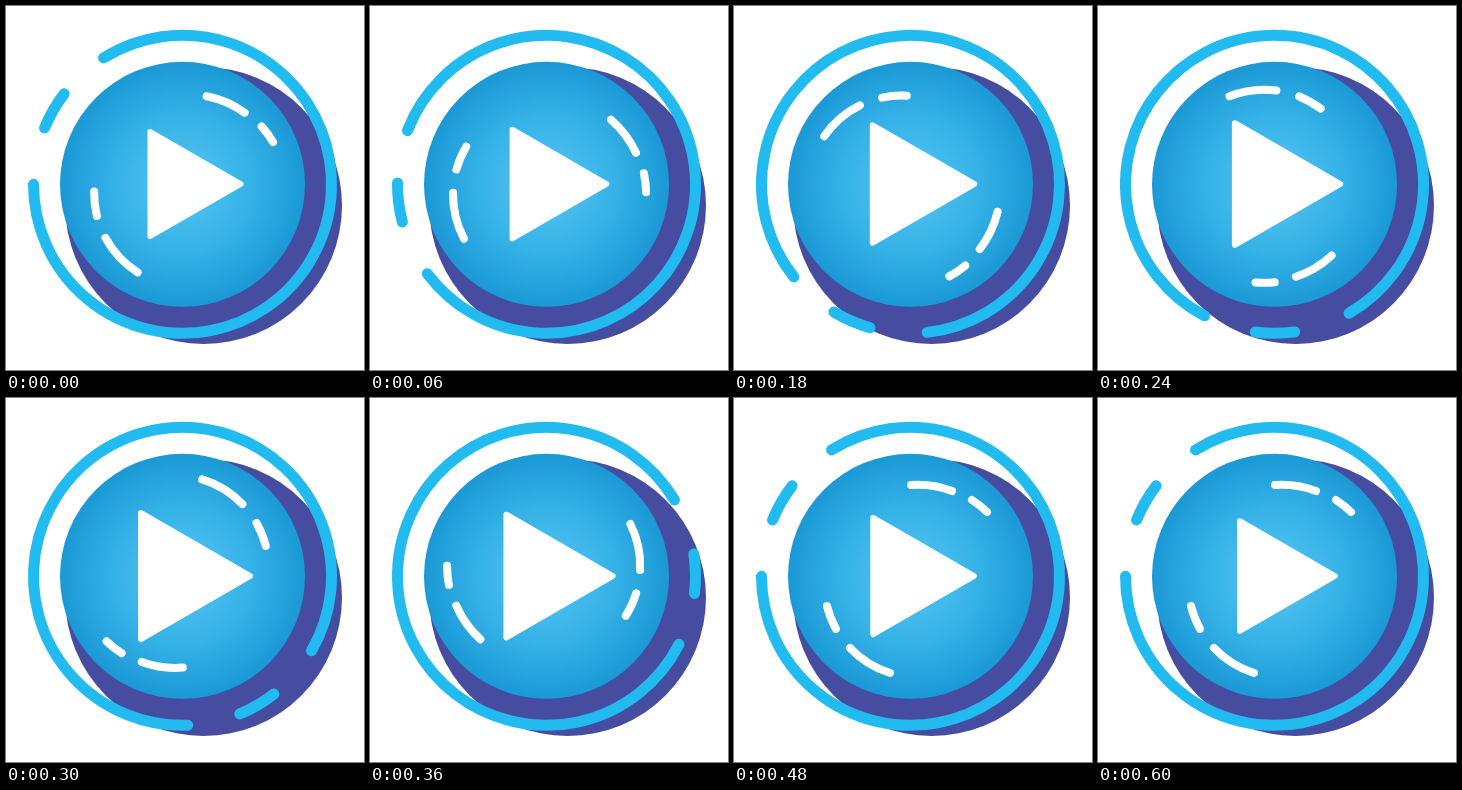
Write an HTML page that moves like this. It is 358 by 364 pixels and loops after 630 ms.

```html
<!DOCTYPE html>
<html lang="en">
<head>
<meta charset="utf-8">
<title>Play button</title>
<style>
  html, body { margin: 0; width: 100%; height: 100%; overflow: hidden; background: #fff; }
  svg { display: block; width: 358px; height: 364px; }
</style>
</head>
<body>
<svg viewBox="0 0 358 364">
  <defs>
    <radialGradient id="face">
      <stop offset="0" stop-color="#5ac6f3"/>
      <stop offset=".55" stop-color="#35b2e7"/>
      <stop offset="1" stop-color="#1b99d6"/>
    </radialGradient>
  </defs>
  <circle cx="197.6" cy="199.6" r="138.4" fill="#464c9f"/>
  <circle cx="176.5" cy="178.3" r="122.5" fill="url(#face)"/>
  <g id="ring" fill="none" stroke="#22bbf0" stroke-width="11" stroke-linecap="round"></g>
  <g id="shine" fill="none" stroke="#fff" stroke-width="8" stroke-linecap="round">
    <path d="M177 87A97.7 97.7 0 0 1 218 93M238 102A97.7 97.7 0 0 1 253 114"/>
    <path d="M93 208A94.2 94.2 0 0 0 102 231M116 250A94.2 94.2 0 0 0 156 275"/>
  </g>
  <path id="tri" d="M135 115L244 178L135 241Z" fill="#fff" stroke="#fff" stroke-width="6" stroke-linejoin="round"/>
</svg>
<script>
const STEP = 30, STEPS = 21;
const CX = 176.5, CY = 178.3, R = 149;
const [ring, shine, tri] = ['ring', 'shine', 'tri'].map(id => document.getElementById(id));

// [step, value]
const ringTurn = [[0, 0], [4, -71], [8, -120], [10, -150], [14, -280], [16, -360]];
const shineTurn = [[0, 15], [4, 75], [8, 141], [10, 179.5], [14, 279.6], [16, 360]];
const triScale = [[0, .835], [10, 1], [20, .876]];

function arc(from, to) {
  const at = deg => {
    const a = deg * Math.PI / 180;
    return `${CX + R * Math.cos(a)} ${CY + R * Math.sin(a)}`;
  };
  return `M${at(from)}A${R} ${R} 0 ${to - from > 180 ? 1 : 0} 1 ${at(to)}`;
}
ring.innerHTML = `<path d="${arc(238, 540)}${arc(202.2, 217.4)}"/>`;

function segment(keys, x) {
  let i = 0;
  while (i < keys.length - 2 && x > keys[i + 1][0]) i++;
  const [x0, y0] = keys[i], [x1, y1] = keys[i + 1];
  return { i, y0, y1, w: x1 - x0, u: Math.min(1, (x - x0) / (x1 - x0)) };
}

function linear(keys, x) {
  const { y0, y1, u } = segment(keys, x);
  return y0 + (y1 - y0) * u;
}

// Cubic Hermite curve through the keys
function smooth(keys, x) {
  const { i, y0, y1, w, u } = segment(keys, x);
  const slope = k => {
    const a = keys[Math.max(0, k - 1)], b = keys[Math.min(keys.length - 1, k + 1)];
    return (b[1] - a[1]) / (b[0] - a[0]) * w;
  };
  const v = 1 - u;
  return y0 * (1 + 2 * u) * v * v + slope(i) * u * v * v
       + y1 * u * u * (3 - 2 * u) - slope(i + 1) * u * u * v;
}

const turn = (el, deg) => el.setAttribute('transform', `rotate(${deg} ${CX} ${CY})`);

function draw(time) {
  const n = Math.floor(time / STEP) % STEPS;
  turn(ring, smooth(ringTurn, n));
  turn(shine, smooth(shineTurn, n));
  tri.setAttribute('transform',
    `translate(189.5 178) scale(${linear(triScale, n)}) translate(-189.5 -178)`);
}

const start = performance.now();
function tick() {
  draw(performance.now() - start);
  requestAnimationFrame(tick);
}
tick();
</script>
</body>
</html>
```
